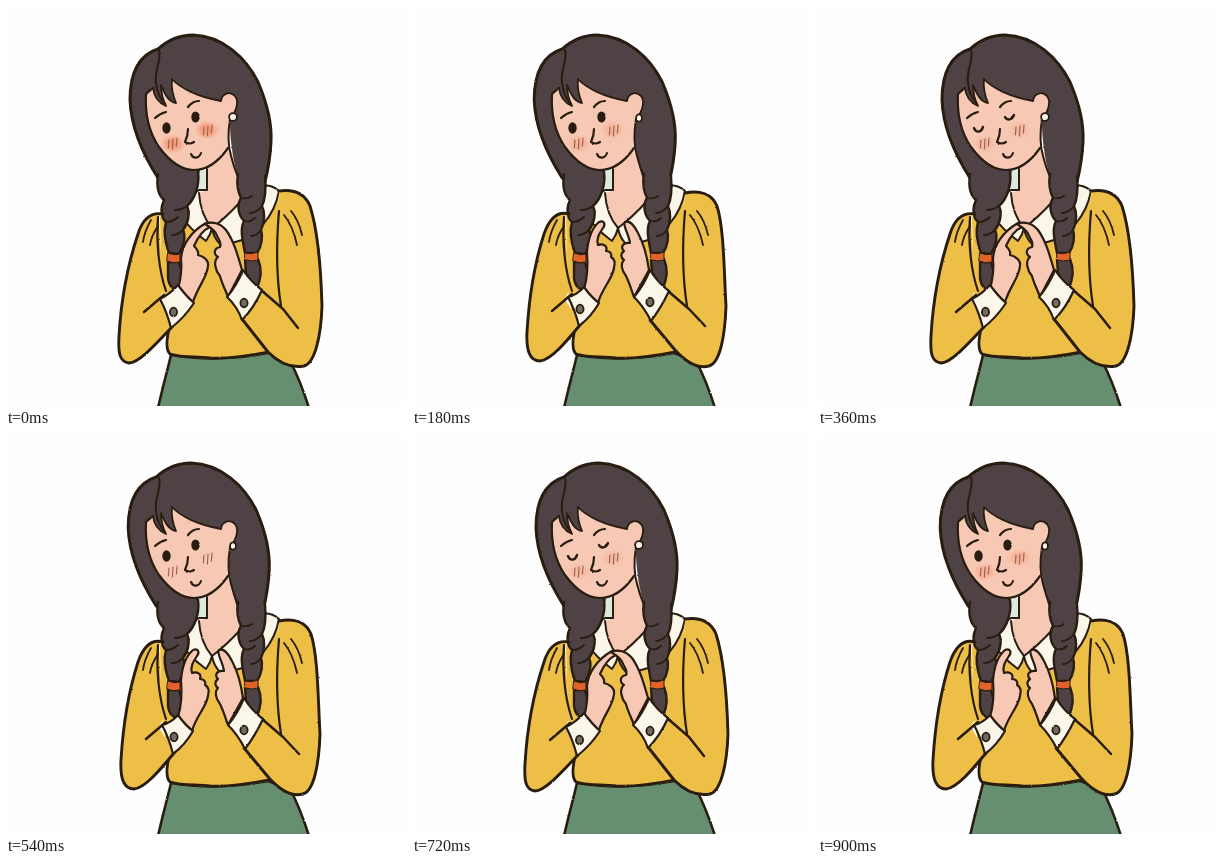
Recreate the animation shown at these times as an HTML page. Size 400 px wide and 400 px high, loop 1.08 s.

```html
<!DOCTYPE html>
<html lang="en">
<head>
<meta charset="utf-8">
<title>Shy girl</title>
<style>
  html, body { margin: 0; width: 100%; height: 100%; overflow: hidden; background: #fefefe; }
  svg { display: block; width: 100vw; height: 100vh; }
</style>
</head>
<body>
<svg id="stage" viewBox="0 0 400 400"></svg>
<script>
const INK = '#281d10', HAIR = '#4f4244', SKIN = '#f7c9b5', YELLOW = '#eebf46',
      GREEN = '#668f72', CREAM = '#faf7ea', ORANGE = '#e2622c';
const STEP = 180;

const shape = (d, fill, width = 2.4) =>
  `<path d="${d}" fill="${fill}" stroke="${INK}" stroke-width="${width}"/>`;
const flat = (d, fill) => `<path d="${d}" fill="${fill}" stroke="none"/>`;
const line = (d, width = 2.2, color = INK) =>
  `<path d="${d}" fill="none" stroke="${color}" stroke-width="${width}"/>`;
const oval = (x, y, rx, ry, fill, extra = '') =>
  `<ellipse cx="${x}" cy="${y}" rx="${rx}" ry="${ry}" fill="${fill}" ${extra}/>`;
const group = (id, body) => `<g id="${id}">${body}</g>`;

const skirt = shape('M165 349C161 366 156 384 152 402L303 402C298 386 292 370 284 355L262 347C230 353 195 354 165 349Z', GREEN, 2.6);

const torso =
  flat('M154 211L190 188L272 186L278 303L262 347C235 353 200 355 166 349C161 345 160 335 162 320L156 285Z', YELLOW) +
  line('M164 319C160 334 160 344 164 348C178 352 190 350 204 352C222 353 242 350 262 346', 2.8);

const neck =
  flat('M188 164L202 164L202 186L186 186Z', '#dcebdd') +
  flat('M201 150L201 184L193 185L194 205L206 222L238 194L234 160L222 140Z', SKIN) +
  line('M201 163L201 184', 2);

const collar =
  shape('M201 184L193 184L184 190L177 212C183 222 192 229 200 235C203 231 205 227 206 222C199 214 194 203 193 187', CREAM, 2) +
  shape('M236 194C227 204 217 214 206 222C207 228 210 234 214 238C222 238 230 236 236 234C250 228 268 212 273 185C268 180 262 179 256 179Z', CREAM, 2);

const braids =
  shape('M162 256L173 256C176 265 178 275 174 282C168 286 163 280 162 272Z', HAIR) +
  shape('M239 253L252 253C257 265 254 276 250 283L240 268Z', HAIR) +
  shape('M152 168C150 182 153 190 158 194C154 202 155 212 160 216C157 226 159 236 163 247L173 248C178 240 180 230 177 224C183 216 184 206 181 200C188 194 194 180 192 166', HAIR) +
  shape('M232 168C230 180 233 188 235 192C230 200 233 210 238 215C234 222 236 232 239 247L251 247C256 240 257 230 255 224C259 216 259 206 256 200C260 192 260 182 259 170', HAIR) +
  line('M181 200C177 203 173 204 169 204M160 216C165 216 169 214 172 211M177 224C173 228 169 229 166 229', 1.8) +
  line('M235 192C239 193 243 192 246 190M256 200C252 205 248 207 244 207M238 215C242 216 246 215 249 212M255 224C252 228 248 230 245 230', 1.8) +
  shape('M162 247Q168 250 174 248L174 256Q167 258 161 255Z', ORANGE, 1) +
  shape('M239 247Q245 249 252 246L252 254Q246 256 239 254Z', ORANGE, 1);

const hair =
  flat('M152 43C162 34 173 29 187 29C217 30 240 52 252 76C261 97 266 118 265 136C264 155 262 165 259 178L233 174C228 160 224 135 224 118L180 110L150 125C163 149 179 161 193 164L191 174L152 174C138 150 125 122 124 94C124 66 133 49 152 43Z', HAIR) +
  line('M152 172C138 150 125 122 124 94C124 66 133 49 152 43C162 34 173 29 187 29C217 30 240 52 252 76C261 97 266 118 265 136C264 155 262 164 259 176', 3) +
  line('M193 164L191 174', 1.8);

const blushSpot = (x, y) => oval(x, y, 13, 10, 'url(#glow)');
const hatch = (x, y) => [0, 4, 8].map(i =>
  line(`M${x + i} ${y - i / 4}l-.6 ${i === 4 ? 10 : 8}`, 1.2, '#a3624c')).join('');

const jaw = 'C139 106 142 125 153 141C164 156 175 164 188 164C201 164 213 155 222 142';
const fringe = 'C148 92 153 97 160 100C157 94 155 88 155 79C159 89 163 96 170 97C167 90 165 82 166 73C174 82 192 91 215 95C216 87 224 85 229 90C233 95 231 105 224 113';
const face =
  flat(`M140 88${jaw}L224 113L224 108L231 100L229 90L215 95L166 73L155 79L147 82Z`, SKIN) +
  flat(`M140 88Q143 85 147 82${fringe}L180 125Z`, SKIN) +
  flat('M147 82C148 92 153 97 160 100C157 94 155 88 155 79L150 76ZM155 79C159 89 163 96 170 97C167 90 165 82 166 73L158 72Z', HAIR) +
  flat('M166 73C174 82 192 91 215 95L218 86L180 74Z', HAIR) +
  line(`M147 82${fringe}`, 1.8) +
  line(`M147 82Q143 85 140 88${jaw}`, 2.2) +
  line('M224 113C222 126 222 140 225 150C227 158 229 164 232 171', 2) +
  line('M153 44C156 54 148 64 150 77C151 86 154 93 159 98', 2) +
  group('blush', blushSpot(167, 138) + blushSpot(201, 124)) +
  hatch(163, 134) + hatch(198, 121) +
  line('M149 112C152 109 156 107 160 106M182 101C185 97 189 95 193 95') +
  line('M182 123C182 128 181 132 179 136C182 138 185 138 188 136') +
  line('M185 148C187 153 193 153 195 147', 2.1) +
  group('open', oval(160.5, 122, 4.2, 5.8, INK) + oval(189.5, 111, 4.2, 5.6, INK)) +
  group('shut', line('M156 122C158 127 163 127 165 121M187 111C189 115 194 114 196 109', 2.4));

const folds = line('M145 214C141 221 138 228 137 236M152 220C148 226 145 232 144 239M278 209C283 215 288 225 291 239M285 205C290 211 294 220 296 229', 1.8);
const button = (x, y) => oval(x, y, 3.6, 4.3, '#6f6a64', `stroke="${INK}" stroke-width="1.8"`);

const arms = p =>
  flat(p.sleeveL + 'L153 293L157 285L153 211Z', YELLOW) +
  line(p.sleeveL, 2.9) +
  line('M152 211C150 237 153 265 160 285') +
  line(p.upperL, 2.5) +
  flat(p.sleeveR + 'L255 284L277 303C273 280 272 240 272 205Z', YELLOW) +
  line(p.sleeveR, 2.9) +
  line('M273 205C270 240 271 275 275 300') +
  line(p.upperR, 2.5) + folds +
  shape(p.handL, SKIN, 2.2) + shape(p.handR, SKIN, 2.2) +
  shape(p.cuffL, CREAM, 2.2) + shape(p.cuffR, CREAM, 2.2) +
  p.buttons.map(b => button(...b)).join('');

const together = {
  sleeveL: 'M157 208C145 206 137 212 132 228C122 258 115 295 113 330C112 348 114 356 123 357C133 357 150 338 166 321',
  upperL: 'M158 289L138 306',
  sleeveR: 'M273 185C288 183 299 188 304 200C312 225 315 265 316 300C315 330 309 357 298 360C287 362 274 358 262 346L236 313',
  upperR: 'M255 284L277 303L292 322',
  handL: 'M172 283C175 272 176 262 175 252C176 240 184 226 200 217L204 221C197 224 192 231 188 240C191 243 193 246 192 249C197 250 203 254 202 260C201 272 192 280 187 296Z',
  handR: 'M236 264C232 250 228 235 220 224C214 217 206 215 199 218C203 221 209 223 211 230C213 234 216 237 214 241C208 242 207 248 212 251C207 255 209 264 214 270C216 278 220 285 222 291Z',
  cuffL: 'M154 293Q164 288 172 279Q180 290 188 297Q178 312 165 322Q161 306 154 293Z',
  cuffR: 'M237 264Q245 276 256 284Q248 302 236 314Q231 300 221 291Q231 279 237 264Z',
  buttons: [[167.5, 306], [238, 297]]
};

const apart = {
  sleeveL: 'M157 208C146 205 138 211 132 228C123 256 117 292 115 326C114 345 118 355 128 355C139 354 154 336 168 319',
  upperL: 'M160 288L140 305',
  sleeveR: 'M273 187C288 184 300 188 305 200C312 222 312 265 314 300C313 330 308 357 297 360C286 363 274 356 263 344L238 314',
  upperR: 'M256 285L277 303L293 320',
  handL: 'M172 283C176 270 176 258 175 246C176 234 180 222 187 216C192 214 194 218 191 222C187 228 184 233 186 239C191 237 196 240 194 245C199 245 200 249 199 251C203 253 203 258 202 262C200 274 190 282 186 297Z',
  handR: 'M237 264C235 250 232 238 226 227C222 219 217 214 213 216C210 219 217 228 218 237C211 236 208 241 212 245C208 248 209 252 212 254C208 258 210 265 214 270C218 278 220 286 222 291Z',
  cuffL: 'M156 291Q165 289 172 281Q179 291 187 297Q179 311 167 320Q163 304 156 291Z',
  cuffR: 'M238 264Q246 277 257 285Q249 302 239 315Q232 301 222 291Q232 279 238 264Z',
  buttons: [[168, 303], [238, 296]]
};

const rim = `stroke="${INK}" stroke-width="1.8"`;
document.getElementById('stage').innerHTML = `
  <defs>
    <radialGradient id="glow">
      <stop offset="0" stop-color="#f0835c" stop-opacity=".75"/>
      <stop offset=".55" stop-color="#f28c66" stop-opacity=".55"/>
      <stop offset="1" stop-color="#f3a07c" stop-opacity="0"/>
    </radialGradient>
    <filter id="crayon" x="0" y="0" width="400" height="400" filterUnits="userSpaceOnUse" color-interpolation-filters="sRGB">
      <feTurbulence type="fractalNoise" baseFrequency=".4" numOctaves="2" seed="4"/>
      <feDisplacementMap in="SourceGraphic" scale="1.6" xChannelSelector="R" yChannelSelector="G"/>
    </filter>
  </defs>
  <g filter="url(#crayon)" stroke-linecap="round" stroke-linejoin="round">
    ${skirt + torso + neck + collar}
    ${group('hair', hair)}
    ${face}
    ${group('earA', oval(227, 111, 3.9, 3.9, CREAM, rim))}
    ${group('earB', oval(227, 112, 2.9, 3.7, CREAM, rim))}
    ${braids}
    ${group('together', arms(together))}
    ${group('apart', arms(apart))}
  </g>`;

const part = id => document.getElementById(id);
const show = (id, on) => part(id).setAttribute('visibility', on ? 'visible' : 'hidden');
const blush = [1, .45, .3, 0, .3, .5];
const shut = [2, 4];
let last = -1;

function pose(step) {
  const touching = step % 2 === 0;
  show('together', touching);
  show('earA', touching);
  show('apart', !touching);
  show('earB', !touching);
  show('shut', shut.includes(step));
  show('open', !shut.includes(step));
  part('blush').setAttribute('opacity', blush[step]);
  part('hair').setAttribute('transform', `translate(${touching ? 0 : -1.8} 0)`);
}

function tick() {
  const step = Math.floor(performance.now() / STEP) % blush.length;
  if (step !== last) pose(last = step);
  requestAnimationFrame(tick);
}
pose(0);
tick();
</script>
</body>
</html>
```
